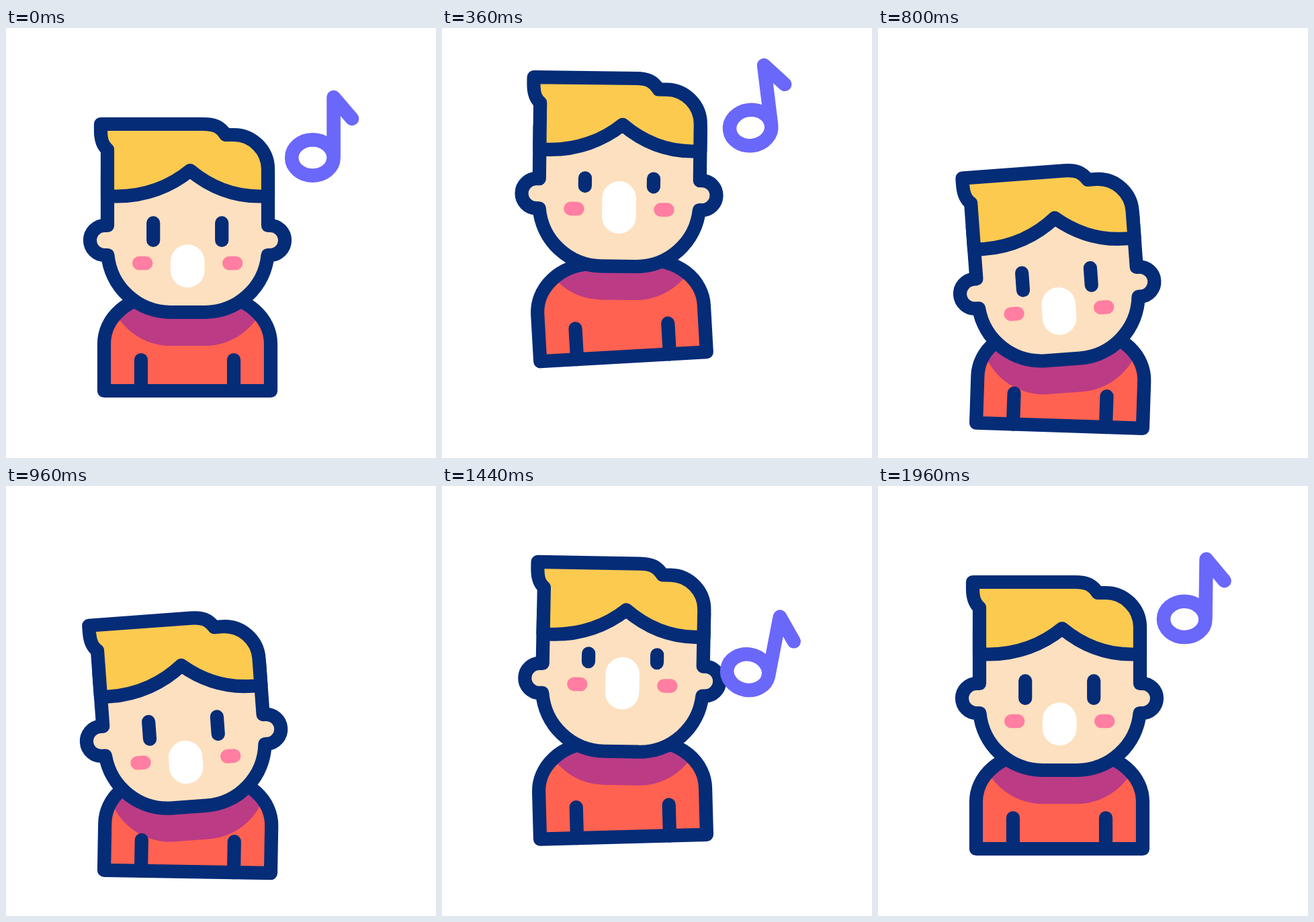
These frames come from a looping animation (640x640 px, 2 s). An HTML page with a canvas:

```html
<!DOCTYPE html>
<html lang="en">
<head>
<meta charset="utf-8">
<title>Singing boy</title>
<style>
  html, body { margin: 0; height: 100%; overflow: hidden; background: #fff; }
  canvas { display: block; width: 100vw; height: 100vh; }
</style>
</head>
<body>
<canvas width="640" height="640"></canvas>
<script>
const ctx = document.querySelector('canvas').getContext('2d');
const LOOP = 2000, STEP = 40, LINE = 20.2;
const NAVY = '#042c77', SKIN = '#fde0bf', HAIR = '#fdca50', PINK = '#ff7ea2',
      SHIRT = '#ff6250', SHADE = '#bc3b85', VIOLET = '#6a67fb';

const torso = new Path2D('M146 540V470A82 71 0 0 1 228 399H312A82 71 0 0 1 394 470V540Z');
const arms = new Path2D('M201 494V540M339 494V540');
const chin = 'A94 94 0 0 0 245 423H296A94 94 0 0 0 389.6 338';
const jaw = new Path2D(`M151.4 338${chin}Z`);
const face = new Path2D(`M151 215V294H147A22 22 0 0 0 147 338H151.4${chin}H393A22 22 0 0 0 393 294H390V215Z`);
const hair = new Path2D('M141 143H293C311 143 319 147 327 159H339C367 159 390 182 390 210V250.5H377C337 250.5 303 236 274 212C245 236 207 250.5 165 250.5H151V181C145 176 141 169 141 153Z');
const note = new Path2D('M31.2 0A31.2 26.6 0 1 1 -31.2 0A31.2 26.6 0 1 1 31.2 0V-90L58.6 -58');

// Cosine easing, held at 0 before and at 1 after
const ease = s => (1 - Math.cos(Math.PI * Math.min(1, Math.max(0, s)))) / 2;
// Swing from rest through a few [time, value] extremes
const swing = (...keys) => t => keys.slice(1).reduce(
  (sum, [end, value], i) => sum + (value - keys[i][1]) * ease((t - keys[i][0]) / (end - keys[i][0])), 0);
// Rise to 1 after `from`, fall back to 0 by `to`
const pulse = (t, from, to, ramp = 360) => ease((t - from) / ramp) * ease((to - t) / ramp);

const bounce = swing([0, 0], [400, -52], [810, 52], [1280, -26], [1700, 0]);
const nod = swing([100, 0], [600, 1.3], [800, -4.2], [1000, -4.2], [1440, 1.1], [1720, 0]);
const lookUp = swing([180, 0], [560, -26], [800, 0], [1080, 3.5], [1440, -26], [1720, 0]);
const lean = t => .05 * bounce(t) - .7 * pulse(t, 0, 1720, 300);

// Turn around a pivot that is moved by dx, dy
function pose(x, y, dx, dy, degrees) {
  ctx.setTransform(1, 0, 0, 1, x + dx, y + dy);
  ctx.rotate(degrees * Math.PI / 180);
  ctx.translate(-x, -y);
}

function fill(path, color) {
  ctx.fillStyle = color;
  ctx.fill(path);
}

function stroke(path, color = NAVY, width = LINE) {
  ctx.strokeStyle = color;
  ctx.lineWidth = width;
  ctx.stroke(path);
}

// Rounded bar standing on y
function pill(x, y, w, h, color) {
  ctx.fillStyle = color;
  ctx.beginPath();
  ctx.roundRect(x - w / 2, y - h, w, h, Math.min(w, h) / 2);
  ctx.fill();
}

function drawBody(t, body, head) {
  body();
  fill(torso, SHIRT);
  ctx.save();
  ctx.clip(torso);
  head();
  ctx.translate(0, 50);
  fill(jaw, SHADE);
  ctx.restore();
  body();
  stroke(torso);
  stroke(arms);
}

function drawHead(t, head) {
  head();
  fill(face, SKIN);
  stroke(face);
  fill(hair, HAIR);
  stroke(hair);

  const blink = pulse(t, 0, 800) + pulse(t, 1060, 1780);
  const sing = pulse(t, 0, 980) + pulse(t, 1010, 1780);
  ctx.translate(270.2, lookUp(t));
  for (const side of [-1, 1]) {
    pill(51 * side, 326, LINE, 46 - 14 * blink, NAVY);
    pill(67 * side, 360.3, 30.4, 20.6, PINK);
  }
  pill(0, 386.3, 50.6, 64 + 14 * sing, '#fff');
}

// Floats up around the loop's seam
function drawNote(t) {
  const u = (t + 600) % LOOP - 600;
  if (u >= 600) return;
  pose(0, 0, 456.4 + .0055 * u + 6e-6 * u * u, 193 - .134 * u + 2.9e-5 * u * u, -.0195 * u);
  stroke(note, VIOLET, 20.6);
}

function draw(t) {
  const body = () => pose(270, 540, 0, bounce(t), lean(t));
  // The head follows the body a little later and further
  const head = () => pose(270.5, 423, 2.4 * lean(t), 1.4 * bounce(t - 24), nod(t));

  ctx.resetTransform();
  ctx.clearRect(0, 0, 640, 640);
  ctx.lineCap = ctx.lineJoin = 'round';
  drawBody(t, body, head);
  drawHead(t, head);
  drawNote(t);
}

const start = performance.now();
function frame() {
  const t = (performance.now() - start) % LOOP;
  draw(Math.floor(t / STEP) * STEP);
  requestAnimationFrame(frame);
}
frame();
</script>
</body>
</html>
```
